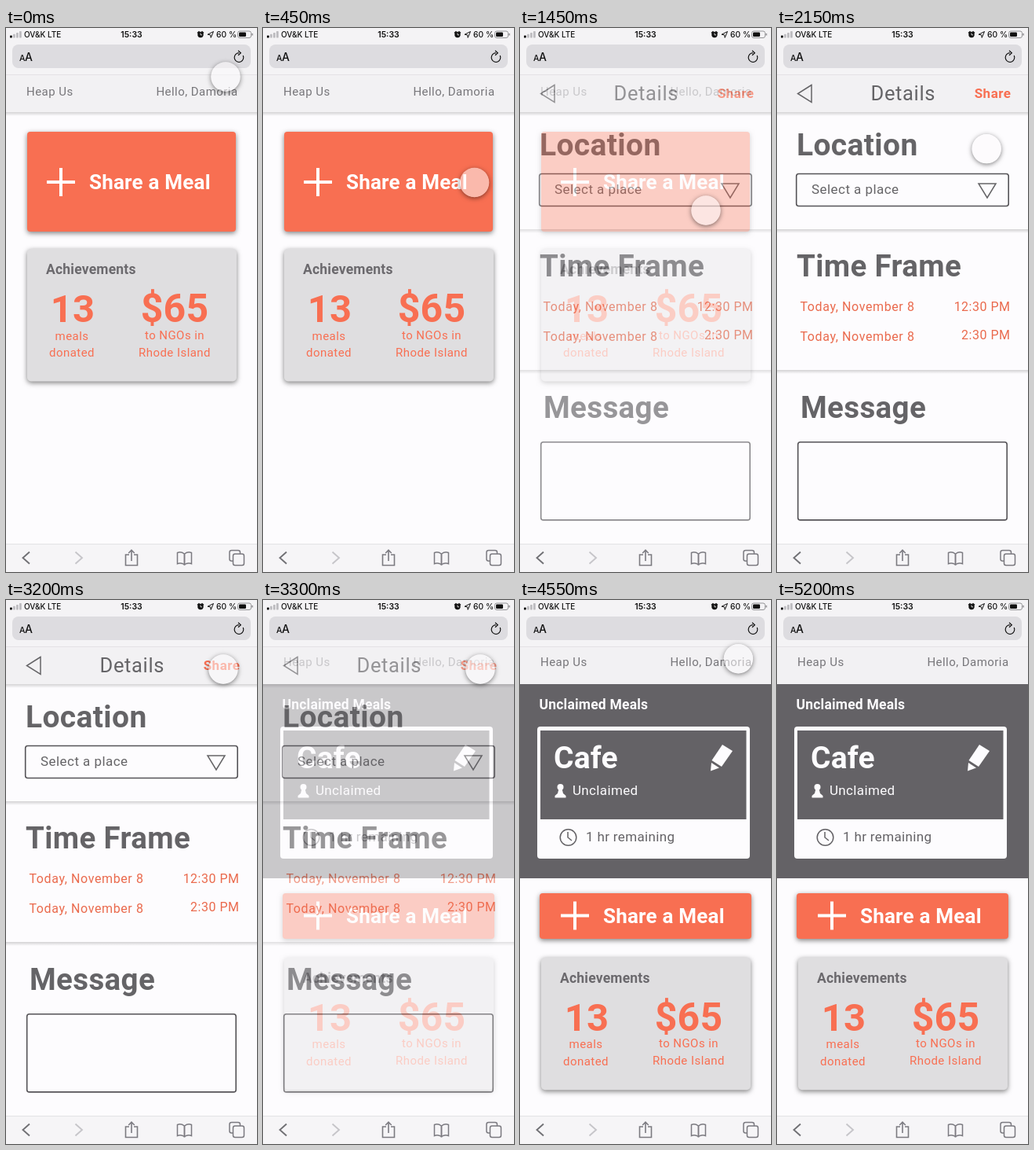
These frames come from a looping animation (320 by 692 pixels, 5.25 s). An HTML page with a canvas:

```html
<!DOCTYPE html>
<html lang="en">
<head>
<meta charset="utf-8">
<title>Meal sharing prototype</title>
<style>
html, body { margin: 0; width: 100%; height: 100%; overflow: hidden; background: #fdfcfe; }
canvas { display: block; width: 320px; height: 692px; }
</style>
</head>
<body>
<canvas id="stage"></canvas>
<script>
const W = 320, H = 692, LOOP = 5250, STEP = 50;
const ORANGE = '#f86f52', DARK = '#646266', WHITE = '#fdfcfe', GREY = '#7b7a80';
const BOLD = { weight: 600, track: .2 };
const ratio = window.devicePixelRatio || 1;

function setup(canvas) {
  canvas.width = W * ratio;
  canvas.height = H * ratio;
  const ctx = canvas.getContext('2d');
  ctx.scale(ratio, ratio);
  return ctx;
}

function text(c, str, x, y, size, color, { weight = 400, align = 'left', track = 0, family = 'Roboto' } = {}) {
  c.font = `${weight} ${size}px ${family}, sans-serif`;
  c.letterSpacing = track + 'px';
  c.textAlign = align;
  c.fillStyle = color;
  c.fillText(str, x, y);
}

function box(c, x, y, w, h, r, fill, shadow) {
  c.save();
  if (shadow) {
    c.shadowColor = 'rgba(0,0,0,.5)';
    c.shadowBlur = 6 * ratio;
    c.shadowOffsetY = 2 * ratio;
  }
  c.beginPath();
  c.roundRect(x, y, w, h, r);
  c.fillStyle = fill;
  c.fill();
  c.restore();
}

function outline(c, x, y, w, h, r, color, width) {
  c.beginPath();
  c.roundRect(x, y, w, h, r);
  c.strokeStyle = color;
  c.lineWidth = width;
  c.stroke();
}

function poly(c, points, { fill, stroke, width = 1.5, close = true }) {
  c.beginPath();
  points.forEach(([x, y]) => c.lineTo(x, y));
  if (close) c.closePath();
  if (fill) { c.fillStyle = fill; c.fill(); }
  if (stroke) { c.strokeStyle = stroke; c.lineWidth = width; c.stroke(); }
}

function fadeDown(c, y, h, alpha) {
  const g = c.createLinearGradient(0, y, 0, y + h);
  g.addColorStop(0, `rgba(0,0,0,${alpha})`);
  g.addColorStop(1, 'rgba(0,0,0,0)');
  c.fillStyle = g;
  c.fillRect(0, y, W, h);
}

function header(c) {
  c.fillStyle = '#f2f1f3';
  c.fillRect(0, 59, W, 48);
  fadeDown(c, 107, 5, .16);
}

function homeHeader(c, y) {
  header(c);
  text(c, 'Heap Us', 26, y, 15, '#77767a', { track: .45 });
  text(c, 'Hello, Damoria', 295.5, y, 15, '#77767a', { track: .45, align: 'right' });
}

function shareButton(c, x, y, w, h, mid) {
  box(c, x, y, w, h, 4, ORANGE, true);
  c.fillStyle = '#fff';
  c.fillRect(52, mid - 2, 36, 4);
  c.fillRect(68, mid - 18, 4, 36);
  text(c, 'Share a Meal', 106, mid + 9, 26, '#fff', BOLD);
}

function achievements(c, y) {
  box(c, 27, y, 267, 168.5, 5, '#dfdee0', true);
  text(c, 'Achievements', 51, y + 32, 17.5, '#6b696d', BOLD);
  const center = { align: 'center', track: .45 };
  const big = { ...BOLD, align: 'center' };
  text(c, '13', 85, y + 93, 49, ORANGE, big);
  text(c, '$65', 215, y + 93, 50, ORANGE, big);
  text(c, 'meals', 84, y + 115.5, 15, ORANGE, center);
  text(c, 'donated', 84, y + 137, 15, ORANGE, center);
  text(c, 'to NGOs in', 215, y + 114.5, 15, ORANGE, center);
  text(c, 'Rhode Island', 215, y + 136.5, 15, ORANGE, center);
}

function drawHome(c) {
  homeHeader(c, 86);
  shareButton(c, 27, 132, 266, 127, 196);
  achievements(c, 281);
}

function drawDetails(c) {
  const ink = '#656467', red = '#ea6a4d';
  header(c);
  poly(c, [[44, 72.5], [26.5, 83.5], [44, 94.5]], { stroke: ink });
  text(c, 'Details', 119.5, 92, 25.5, ink, { track: .65 });
  text(c, 'Share', 298.5, 89, 17, ORANGE, { weight: 600, align: 'right', track: .5 });

  for (const y of [256, 435]) fadeDown(c, y, 5, .17);
  const title = { weight: 600, track: .35 };
  text(c, 'Location', 25, 162, 39, ink, title);
  text(c, 'Time Frame', 25, 316, 38.5, ink, title);
  text(c, 'Message', 30, 496, 38.5, ink, title);

  outline(c, 24.7, 185.5, 270.5, 41, 3, '#555357', 1.6);
  text(c, 'Select a place', 44, 211, 17, ink, { track: .45 });
  poly(c, [[257, 198], [279, 198], [268, 216]], { stroke: ink });

  const row = { track: .6 }, end = { track: .5, align: 'right' };
  text(c, 'Today, November 8', 29.5, 360, 16, red, row);
  text(c, 'Today, November 8', 29.5, 398, 16, red, row);
  text(c, '12:30 PM', 297.5, 360, 16, red, end);
  text(c, '2:30 PM', 297.5, 396, 16, red, end);
  outline(c, 26.7, 526.7, 266.5, 99.2, 3, '#555357', 1.6);
}

function drawClaim(c) {
  homeHeader(c, 84);
  c.fillStyle = DARK;
  c.fillRect(0, 107, W, 247);
  text(c, 'Unclaimed Meals', 24.5, 139, 17.5, WHITE, BOLD);
  box(c, 22, 161, 271, 168, 4, WHITE);
  c.fillStyle = DARK;
  c.fillRect(26, 166, 262.5, 113);
  text(c, 'Cafe', 43, 214, 39, WHITE, BOLD);
  text(c, 'Unclaimed', 67, 248, 17, WHITE, { track: .35 });

  // pencil
  poly(c, [[258, 184], [271, 192], [257, 212], [244.5, 204]], { fill: WHITE });
  poly(c, [[244, 207], [254, 213.5], [243, 217.5]], { fill: WHITE });

  // person
  c.beginPath();
  c.arc(51.5, 238, 4, 0, 7);
  c.fillStyle = WHITE;
  c.fill();
  poly(c, [[49.5, 240], [53.5, 240], [55, 246], [58.5, 249], [58.5, 251.5], [44.5, 251.5], [44.5, 249], [48, 246]], { fill: WHITE });

  // clock
  c.beginPath();
  c.arc(61.5, 302, 10.3, 0, 7);
  c.strokeStyle = DARK;
  c.lineWidth = 1.5;
  c.stroke();
  poly(c, [[61, 295], [61, 302], [66, 306]], { stroke: DARK, close: false });
  text(c, '1 hr remaining', 84, 307, 17, DARK, { track: .35 });

  shareButton(c, 25, 373, 270, 58, 401.5);
  achievements(c, 454.7);
}

function statusBar(c) {
  c.fillStyle = '#f4f3f5';
  c.fillRect(0, 0, W, 59);
  c.fillStyle = '#dedde0';
  c.fillRect(0, 59, W, .7);

  const ui = { family: 'Inter', weight: 500 };
  for (let i = 0; i < 4; i++) {
    const h = 3 + i * 1.8;
    box(c, 5 + i * 4, 12.5 - h, 2.8, h, .7, i ? '#bdbcc0' : '#111');
  }
  text(c, 'OV&K LTE', 23, 12, 10, '#111', ui);
  text(c, '15:33', 160, 12, 10.5, '#111', { ...ui, weight: 600, align: 'center' });
  text(c, '60 %', 268, 12, 10.3, '#111', ui);

  // alarm
  c.beginPath();
  c.arc(248, 8.5, 3.7, 0, 7);
  c.fillStyle = '#111';
  c.fill();
  poly(c, [[244, 6.5], [246.5, 4.2]], { stroke: '#111', close: false });
  poly(c, [[252, 6.5], [249.5, 4.2]], { stroke: '#111', close: false });
  poly(c, [[248, 6.5], [248, 8.8], [250, 8.8]], { stroke: '#fff', width: .8, close: false });
  // location arrow
  poly(c, [[264.5, 4.5], [257, 8.3], [260.7, 8.8], [261.2, 12.3]], { stroke: '#111', width: 1 });
  // battery
  outline(c, 295.5, 4, 17, 8.5, 2.5, '#8a898d', .9);
  box(c, 297, 5.5, 9, 5.5, 1.2, '#111');
  box(c, 313.5, 6.7, 1.3, 3, .6, '#8a898d');

  box(c, 8, 21, 304, 30, 8, '#dddce0');
  text(c, 'A', 17, 41.5, 10.5, '#111', ui);
  text(c, 'A', 24, 41.5, 14, '#111', ui);
  // reload
  c.beginPath();
  c.arc(297, 37.5, 5.8, -.45, 4.7);
  c.strokeStyle = '#111';
  c.lineWidth = 1.2;
  c.stroke();
  poly(c, [[296, 28.8], [299.3, 31.7], [296, 34.7]], { stroke: '#111', width: 1.2, close: false });
}

function toolBar(c) {
  c.fillStyle = '#f6f5f7';
  c.fillRect(0, 656, W, 36);
  c.fillStyle = '#dcdbde';
  c.fillRect(0, 656, W, .7);
  const line = { stroke: GREY, width: 1.6, close: false };
  poly(c, [[30, 666.5], [21.5, 674], [30, 681.5]], { ...line, stroke: '#707074', width: 1.9 });
  poly(c, [[88.5, 666.5], [97, 674], [88.5, 681.5]], { ...line, stroke: '#c6c5c9', width: 1.9 });
  // share
  poly(c, [[157, 670], [152.5, 670], [152.5, 683.5], [167.5, 683.5], [167.5, 670], [163, 670]], line);
  poly(c, [[160, 678], [160, 664.5]], line);
  poly(c, [[156.2, 668], [160, 664.2], [163.8, 668]], line);
  // book
  for (const s of [-1, 1]) {
    c.beginPath();
    c.moveTo(227.5, 669);
    c.quadraticCurveTo(227.5 + s * 4.5, 665.5, 227.5 + s * 9, 667.5);
    c.lineTo(227.5 + s * 9, 681.5);
    c.quadraticCurveTo(227.5 + s * 4.5, 679.5, 227.5, 682.5);
    c.closePath();
    c.strokeStyle = GREY;
    c.lineWidth = 1.5;
    c.stroke();
  }
  // tabs
  outline(c, 285, 664.5, 13.5, 13.5, 2.5, GREY, 1.5);
  box(c, 289.5, 669, 14, 14.5, 2.5, '#f6f5f7');
  outline(c, 289.5, 669, 14, 14.5, 2.5, GREY, 1.5);
}

function layer(draw) {
  const canvas = document.createElement('canvas');
  const c = setup(canvas);
  c.fillStyle = WHITE;
  c.fillRect(0, 0, W, H);
  draw(c);
  statusBar(c);
  toolBar(c);
  return canvas;
}

const clamp = v => Math.max(0, Math.min(1, v));
const span = (t, a, b) => clamp((t - a) / (b - a));
const mix = (a, b, p) => a + (b - a) * p;
const smooth = p => p * p * (3 - 2 * p);
const cubic = p => p < .5 ? 4 * p ** 3 : 1 - 4 * (1 - p) ** 3;

function fingerAt(t) {
  if (t < 1880) {
    const p = Math.sin(span(t, 0, 1000) * Math.PI / 2), q = 1 - p;
    return [
      280 * q * q + 594 * p * q + 237 * p * p,
      62 * q * q + 400 * p * q + 232 * p * p
    ];
  }
  if (t < 4300) {
    const p = smooth(span(t, 1880, 2390));
    return [mix(237, 277, Math.sin(p * Math.PI / 2)), mix(232, 88, p)];
  }
  const p = cubic(span(t, 4350, 5000));
  return [277 + 3 * clamp(p * 4), mix(88, -26, p)];
}

function drawFinger(c, [x, y]) {
  const r = 18.7;
  c.save();
  c.beginPath();
  c.rect(0, 0, W, H);
  c.arc(x, y, r, 0, 7);
  c.clip('evenodd');
  c.shadowColor = 'rgba(0,0,0,.55)';
  c.shadowBlur = 6 * ratio;
  c.shadowOffsetY = 1.5 * ratio;
  c.beginPath();
  c.arc(x, y, r - .4, 0, 7);
  c.fillStyle = '#fff';
  c.fill();
  c.restore();
  c.beginPath();
  c.arc(x, y, r, 0, 7);
  c.fillStyle = 'rgba(253,252,253,.53)';
  c.fill();
}

const ctx = setup(document.getElementById('stage'));
const home = layer(drawHome), details = layer(drawDetails), claim = layer(drawClaim);

function show(screen, alpha) {
  if (alpha <= 0) return;
  ctx.globalAlpha = alpha;
  ctx.drawImage(screen, 0, 0, W, H);
  ctx.globalAlpha = 1;
}

const start = performance.now();
function render() {
  const t = Math.floor((performance.now() - start) % LOOP / STEP) * STEP;
  show(home, 1);
  show(details, span(t, 1250, 1550));
  show(claim, span(t, 3200, 3500));
  drawFinger(ctx, fingerAt(t));
  requestAnimationFrame(render);
}
render();
</script>
</body>
</html>
```
